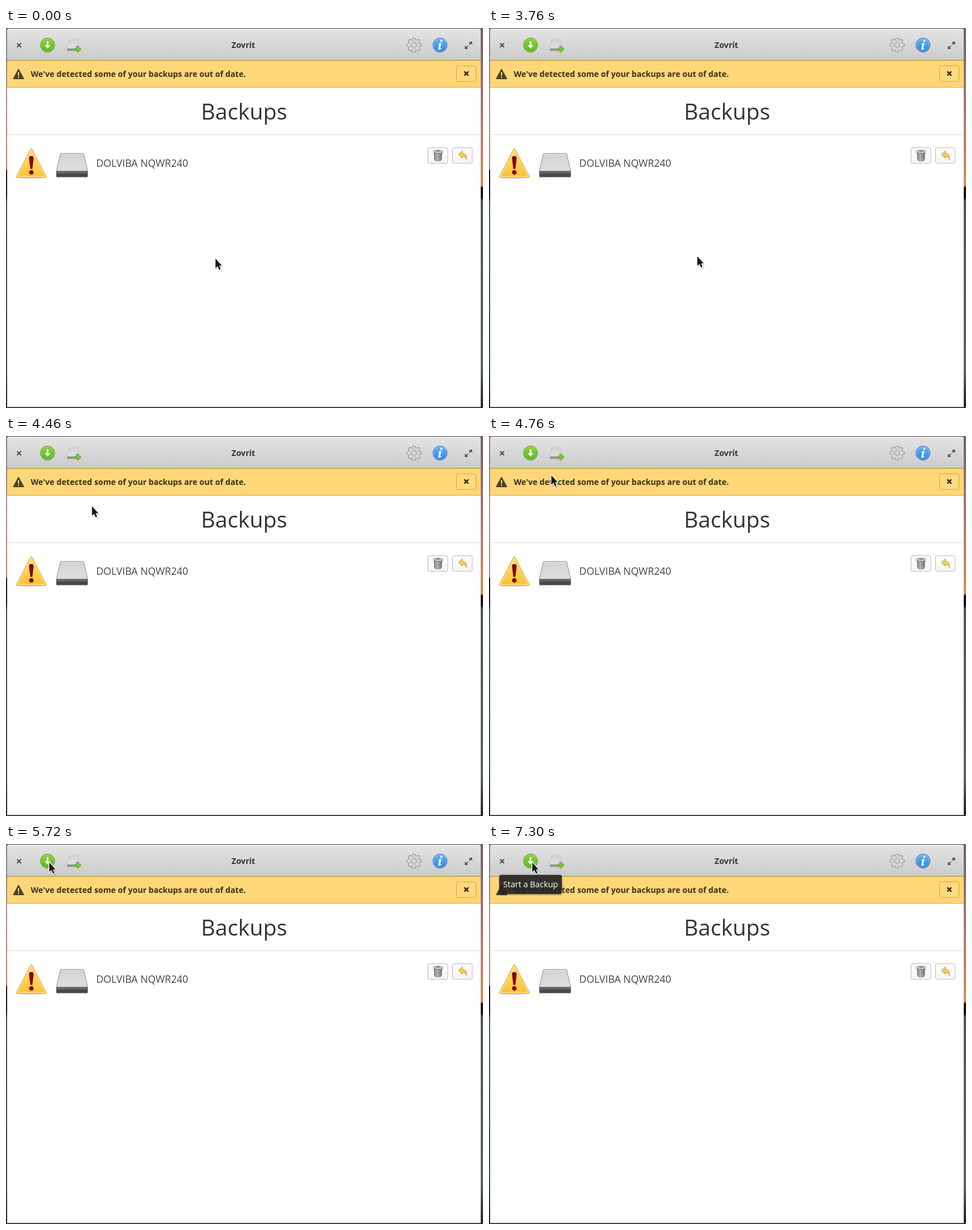
Animation of 838 by 668 pixels, one loop 8000 ms. Source, as an HTML page:

```html
<!DOCTYPE html>
<html lang="en">
<head>
<meta charset="utf-8">
<title>Backups</title>
<style>
  html, body { margin: 0; width: 100%; height: 100%; overflow: hidden; background: #fff; }
  svg { display: block; width: 838px; height: 668px; }
  text { font-family: "Open Sans", "Noto Sans", sans-serif; }
  .bold { font-weight: 700; font-size: 14.13px; }
</style>
</head>
<body>
<svg viewBox="0 0 838 668" xmlns="http://www.w3.org/2000/svg">
  <defs>
    <linearGradient id="deskL" x2="0" y2="1">
      <stop offset="0" stop-color="#8d7a80"/><stop offset=".2" stop-color="#b98d85"/>
      <stop offset=".37" stop-color="#c08468"/><stop offset=".376" stop-color="#1a1414"/>
      <stop offset=".44" stop-color="#15161a"/><stop offset=".46" stop-color="#4a545e"/>
      <stop offset=".9" stop-color="#3c464f"/><stop offset="1" stop-color="#15191d"/>
    </linearGradient>
    <linearGradient id="deskR" x2="0" y2="1">
      <stop offset="0" stop-color="#6f5c66"/><stop offset=".15" stop-color="#9a7272"/>
      <stop offset=".38" stop-color="#cf8560"/><stop offset=".415" stop-color="#d98a5c"/>
      <stop offset=".42" stop-color="#1c1212"/><stop offset=".445" stop-color="#141215"/>
      <stop offset=".455" stop-color="#4b5660"/><stop offset=".9" stop-color="#56626a"/>
      <stop offset="1" stop-color="#1b2024"/>
    </linearGradient>
    <linearGradient id="bar" x2="0" y2="1">
      <stop offset="0" stop-color="#e3e3e3"/><stop offset="1" stop-color="#cbcbcb"/>
    </linearGradient>
    <linearGradient id="green" x2="0" y2="1">
      <stop offset="0" stop-color="#8fd43a"/><stop offset="1" stop-color="#5ab520"/>
    </linearGradient>
    <linearGradient id="blue" x2="0" y2="1">
      <stop offset="0" stop-color="#66b5f6"/><stop offset="1" stop-color="#2f83e4"/>
    </linearGradient>
    <linearGradient id="amber" x2="0" y2="1">
      <stop offset="0" stop-color="#ffe07c"/><stop offset="1" stop-color="#fcc135"/>
    </linearGradient>
    <linearGradient id="steel" x2="0" y2="1">
      <stop offset="0" stop-color="#d4d4d4"/><stop offset="1" stop-color="#dedede"/>
    </linearGradient>
    <linearGradient id="front" x2="0" y2="1">
      <stop offset="0" stop-color="#757575"/><stop offset=".5" stop-color="#575757"/>
      <stop offset="1" stop-color="#404040"/>
    </linearGradient>
    <linearGradient id="can" x2="1" y2="0">
      <stop offset="0" stop-color="#858585"/><stop offset=".4" stop-color="#d2d2d2"/>
      <stop offset="1" stop-color="#777"/>
    </linearGradient>
    <linearGradient id="key" x2="0" y2="1">
      <stop offset="0" stop-color="#fff"/><stop offset="1" stop-color="#f4f4f4"/>
    </linearGradient>
    <filter id="soft" x="-50%" y="-50%" width="200%" height="200%">
      <feGaussianBlur stdDeviation="1.3"/>
    </filter>
    <path id="cross" d="M-3.6-3.6L3.6 3.6M3.6-3.6L-3.6 3.6"/>
    <path id="arrow" d="M0 0V16.8L3.8 13.3L6.4 19.4L9.1 18.2L6.6 12.2H11.3Z"/>
  </defs>

  <!-- desktop and window -->
  <rect width="420" height="668" fill="url(#deskL)"/>
  <rect x="420" width="418" height="668" fill="url(#deskR)"/>
  <rect width="838" height="2" fill="#75666d"/>
  <rect y="665" width="838" height="3" fill="#2a2f33"/>
  <path d="M2 666.3V5Q2 1.5 5 1.5H831Q834 1.5 834 5V666.3Z" fill="#fff"/>
  <path d="M2 57V5Q2 1.5 5 1.5H831Q834 1.5 834 5V57Z" fill="url(#bar)"/>
  <path d="M4 2.5H832" stroke="#f0f0f0"/>
  <rect x="2" y="57" width="832" height="47.8" fill="#ffd778"/>
  <path d="M2 56.5H834" stroke="#b3a27c"/>
  <path d="M2 57.5H834" stroke="#e3b247"/>
  <path d="M2 104.3H834" stroke="#e3b33a" stroke-width="1.2"/>
  <path d="M2 187.5H834" stroke="#d9d9d9"/>

  <!-- header -->
  <use href="#cross" x="23" y="30.3" stroke="#555" stroke-width="2.2"/>
  <text class="bold" x="417" y="35" text-anchor="middle" fill="#333">Zovrit</text>
  <circle cx="73" cy="30" r="12.4" fill="url(#green)" stroke="#4b9420"/>
  <circle cx="73" cy="30" r="11.3" fill="none" stroke="#fff" stroke-opacity=".25"/>
  <path d="M71.6 23.3H74.4V30.2H78.2L73 36.2L67.8 30.2H71.6Z" fill="#fff"/>
  <g>
    <path d="M110.5 21H126.5L129.7 36H107.3Z" fill="url(#steel)" stroke="#c2c2c2" stroke-width=".9"/>
    <rect x="107.2" y="36" width="22.6" height="4.2" rx="1" fill="#949494"/>
    <path d="M124.2 31.8H127.8V35.2H131.2V38.8H127.8V42.2H124.2V38.8H120.8V35.2H124.2Z" fill="#7bc92f" stroke="#559f20" stroke-width=".8"/>
  </g>
  <g transform="translate(717 30)" stroke="#8e8e8e">
    <path id="gear" fill="#dcdcdc" stroke-linejoin="round" stroke-width="1.1"/>
    <circle r="7" fill="none" stroke="#b8b8b8"/>
    <circle r="4.4" fill="#d6d6d6"/>
  </g>
  <circle cx="762.5" cy="30" r="12.4" fill="url(#blue)" stroke="#2d6cbd"/>
  <circle cx="762.5" cy="30" r="11.3" fill="none" stroke="#fff" stroke-opacity=".3"/>
  <g fill="#fff" transform="translate(762.5 30) scale(1.1) translate(-762.5 -30)">
    <circle cx="764.6" cy="23.2" r="1.8"/>
    <path d="M760 27.4L765 26.6L762.8 35.1Q762.6 36.3 765 34.7L765.3 35.4Q762.4 38 760.5 37.5Q759.2 37 759.7 35.2L761.3 28.8L759.7 28.5Z"/>
  </g>
  <g fill="#555" stroke="#555" stroke-width="2">
    <path d="M813.5 29L817 25.5M811.5 31.5L808 35" fill="none"/>
    <path d="M813.2 24H819V29.8ZM806 31.2V37H811.8Z" stroke="none"/>
  </g>

  <!-- info strip -->
  <path d="M22 73L30.6 89H13.4Z" fill="#4b4024" stroke="#4b4024" stroke-width="2" stroke-linejoin="round"/>
  <path d="M20.7 77.5H23.3L22.9 84H21.1ZM20.9 85.4H23.1V87.6H20.9Z" fill="#ffd778"/>
  <text class="bold" x="43.4" y="86" fill="#382e1b">We've detected some of your backups are out of date.</text>
  <rect x="791.5" y="66.5" width="34.5" height="27.5" rx="3" fill="#ffd97f" stroke="#d9a42c"/>
  <use href="#cross" x="808.7" y="80" stroke="#33290f" stroke-width="2.5"/>

  <!-- page -->
  <text x="418.3" y="161.2" text-anchor="middle" font-size="38.8" fill="#333">Backups</text>
  <ellipse cx="44.5" cy="263" rx="26" ry="1.8" fill="#000" opacity=".18"/>
  <path d="M44.5 213.8L69.2 261.4H19.8Z" fill="url(#amber)" stroke="#d9a53a" stroke-width="3.8" stroke-linejoin="round"/>
  <path d="M44.5 214.2L69 261.2H20Z" fill="url(#amber)" stroke="#ffdc78" stroke-width="2" stroke-linejoin="round"/>
  <path d="M44.5 225Q48.9 225 48.5 229.5L46.4 246.5Q46 248 44.5 248Q43 248 42.6 246.5L40.5 229.5Q40.1 225 44.5 225Z" fill="#7d0505"/>
  <circle cx="44.5" cy="253.8" r="3.9" fill="#7d0505"/>

  <rect x="88" y="260" width="56" height="3" rx="1.5" fill="#000" opacity=".2"/>
  <path d="M97.5 220.5H134.5Q136.3 220.5 136.8 222.3L143 249.5V252H89V249.5L95.2 222.3Q95.7 220.5 97.5 220.5Z" fill="url(#steel)" stroke="#8c8c8c"/>
  <path d="M97.5 221.7H134.5" stroke="#eee"/>
  <rect x="88.7" y="251" width="54.6" height="10.6" rx="1.5" fill="url(#front)" stroke="#4a4a4a" stroke-width=".8"/>
  <path d="M89.8 250.6H142.2" stroke="#ececec"/>
  <path d="M91 257.5H141" stroke="#383838"/>
  <text x="158.5" y="244" font-size="17.6" fill="#444">DOLVIBA NQWR240</text>

  <g fill="url(#key)" stroke="#b8b8b8">
    <rect x="741.5" y="210.5" width="34.5" height="27.5" rx="2.5"/>
    <rect x="784.5" y="210.5" width="34.5" height="27.5" rx="2.5"/>
  </g>
  <path d="M752 218.5H766L765 232Q764.7 233.8 759 233.8Q753.3 233.8 753 232Z" fill="url(#can)" stroke="#666" stroke-width=".8"/>
  <path d="M755.5 221L756 231.5M759 221V232M762.5 221L762 231.5" stroke="#6a6a6a"/>
  <ellipse cx="759" cy="217.6" rx="8.2" ry="2.9" fill="#d0d0d0" stroke="#666"/>
  <ellipse cx="759" cy="216.8" rx="4" ry="1.1" fill="#8a8a8a"/>
  <path d="M794.9 222.4L801.6 216V219.7Q810.2 220.5 809.1 231.5Q807.2 225.6 801.6 225.4V229Z" fill="#f6cb5c" stroke="#cf9a2b" stroke-linejoin="round"/>

  <g id="tip">
    <rect x="17.5" y="56" width="111" height="33.5" rx="4" fill="#000" opacity=".35" filter="url(#soft)"/>
    <rect x="18" y="54" width="110" height="34" rx="4" fill="#272727" fill-opacity=".89"/>
    <path d="M21 54.7H125" stroke="#fff" stroke-opacity=".12"/>
    <text x="25" y="76" font-size="14.3" fill="#fff">Start a Backup</text>
  </g>
  <g id="cursor">
    <use href="#arrow" x="1.8" y="2.2" fill="#000" opacity=".4" filter="url(#soft)"/>
    <use href="#arrow" fill="#1a1a1a" stroke="#fff" stroke-width="2.6" stroke-linejoin="round" paint-order="stroke"/>
  </g>
</svg>
<script>
  const LOOP = 8000, TICK = 20;
  const $ = id => document.getElementById(id);
  const cursor = $("cursor"), tip = $("tip");

  function gearPath(teeth) {
    const step = 2 * Math.PI / teeth, pts = [];
    for (let i = 0; i < teeth; i++) {
      for (const [r, a] of [[10, -.32], [12.7, -.2], [12.7, .2], [10, .32]]) {
        const w = (i + a) * step;
        pts.push((r * Math.sin(w)).toFixed(2) + " " + (-r * Math.cos(w)).toFixed(2));
      }
    }
    return "M" + pts.join("L") + "Z";
  }
  $("gear").setAttribute("d", gearPath(8));

  const linear = u => u;
  const glide = u => .35 * u + .65 * u * u * (3 - 2 * u);
  const easeOut = u => 1 - (1 - u) ** 1.8;

  // time, x, y, easing used to arrive there
  const path = [
    [0, 368, 405.5, linear],
    [3740, 368, 405.5, linear],
    [3760, 366, 401.5, linear],
    [4460, 151, 123.5, glide],
    [4500, 142, 109, linear],
    [4580, 142, 109, linear],
    [5060, 85, 39, easeOut],
    [5150, 85, 39, linear],
    [5340, 75, 30.5, glide],
    [5430, 75, 30.5, linear],
    [5480, 76, 32.5, linear],
    [LOOP, 76, 32.5, linear]
  ];

  function place(t) {
    const i = path.findIndex(k => k[0] > t);
    const [t0, x0, y0] = path[i - 1], [t1, x1, y1, ease] = path[i];
    const u = ease((t - t0) / (t1 - t0));
    return [x0 + (x1 - x0) * u, y0 + (y1 - y0) * u].map(v => Math.round(v * 2) / 2);
  }

  function draw(ms) {
    const t = Math.floor(ms % LOOP / TICK) * TICK;
    cursor.setAttribute("transform", `translate(${place(t)})`);
    tip.setAttribute("opacity", Math.max(0, Math.min(1, (t - 6960) / 60)));
  }

  const start = performance.now();
  function frame() {
    draw(performance.now() - start);
    requestAnimationFrame(frame);
  }
  frame();
</script>
</body>
</html>
```
